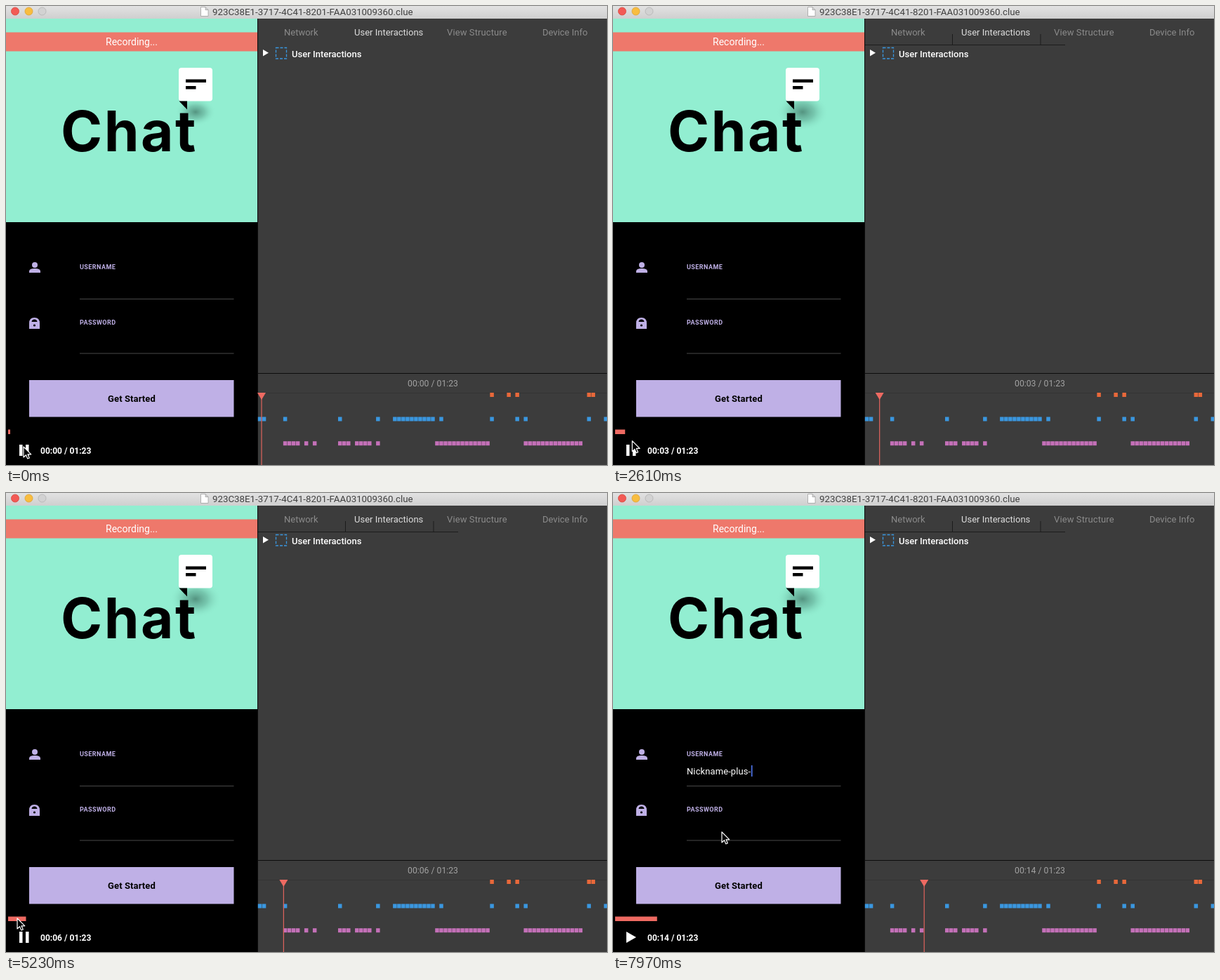
Recreate the animation shown at these times as an HTML page. Size 856x654 px, loop 8000 ms.

```html
<!DOCTYPE html>
<html lang="en">
<head>
<meta charset="utf-8">
<title>Session recorder</title>
<style>
  html, body { margin: 0; width: 100%; height: 100%; overflow: hidden; background: #3c3c3c; }
  svg { display: block; font: 13px Roboto, sans-serif; }
  text { white-space: pre; }
  .tab { fill: #8b8b8b; }
  .label { font-size: 9px; font-weight: 700; letter-spacing: .45px; fill: #bfb0e6; }
  .mid { text-anchor: middle; }
</style>
</head>
<body>
<svg width="856" height="654" viewBox="0 0 856 654">
  <defs>
    <linearGradient id="chrome" x2="0" y2="1">
      <stop stop-color="#e2e2e2"/><stop offset="1" stop-color="#cfcfcf"/>
    </linearGradient>
    <radialGradient id="shade">
      <stop stop-color="#3f7565" stop-opacity=".75"/>
      <stop offset=".45" stop-color="#5a9f8b" stop-opacity=".5"/>
      <stop offset="1" stop-color="#92eed1" stop-opacity="0"/>
    </radialGradient>
  </defs>

  <!-- Window bar -->
  <rect width="856" height="18" fill="url(#chrome)"/>
  <g stroke-width=".8">
    <circle cx="13" cy="7.5" r="5.5" fill="#f25a55" stroke="#d8483f"/>
    <circle cx="32.5" cy="7.5" r="5.5" fill="#f8bd3f" stroke="#dca032"/>
    <circle cx="51.5" cy="7.5" r="5.5" fill="#d2d2d2" stroke="#b2b2b2"/>
  </g>
  <path d="M277.5 1.5h6.500l4 4v9h-10.500zM284 1.500v4h4" fill="#fff" stroke="#a0a0a0" stroke-width=".8"/>
  <text x="294" y="12.500" font-size="13.3" fill="#404040">923C38E1-3717-4C41-8201-FAA031009360.clue</text>

  <!-- Phone screen -->
  <rect y="18" width="358" height="636"/>
  <rect y="18" width="358" height="290" fill="#92eed1"/>
  <rect y="37.500" width="358" height="27" fill="#ee786b"/>
  <text class="mid" x="179" y="56" font-size="14" fill="#fff">Recording...</text>
  <ellipse id="shadow" cx="270" cy="151" fill="url(#shade)"/>
  <rect x="246" y="88" width="48" height="47.500" rx="4" fill="#fff"/>
  <path d="M256 104.500h29v4.500h-29zM256 114h14.500v4.500h-14.500zM246.500 135.500h11.500v12z"/>
  <text x="78" y="207" style="font:700 80px Inter,sans-serif;letter-spacing:2.500px">Chat</text>

  <g fill="#bfb0e6">
    <circle cx="41" cy="369" r="4"/>
    <path d="M33 380v-2q0-4 8-4t8 4v2z"/>
    <path fill-rule="evenodd" d="M33 460v-8q0-8 7.500-8t7.500 8v8zM36.500 450h8q-.5-3.500-4-3.500t-4 3.500z"/>
    <circle cx="40.500" cy="455" r="1.600" fill="#000"/>
    <rect x="33" y="533" width="291.500" height="52.500"/>
  </g>
  <text class="label" x="105" y="374.500">USERNAME</text>
  <text class="label" x="105" y="453.500">PASSWORD</text>
  <path d="M105 417.500h219.500M105 495h219.500" stroke="#484848"/>
  <text id="entry" x="105" y="400.500" fill="#fff" letter-spacing=".1"></text>
  <rect id="caret" y="388" width="1.800" height="16" fill="#4a6ee0"/>
  <text class="mid" x="179" y="563.500" font-weight="700" letter-spacing=".1">Get Started</text>

  <!-- Player -->
  <rect id="bar" x="3" y="603.500" height="6.500" fill="#ee6a62"/>
  <path id="button" fill="#fff"/>
  <text id="clock" x="49" y="638" font-size="12" font-weight="700" fill="#fff"></text>

  <!-- Inspector -->
  <rect x="358" y="18" width="498" height="636" fill="#3c3c3c"/>
  <path d="M358.500 18v636M358 523.500h498" stroke="#0c0c0c"/>
  <path d="M359 551.500h497" stroke="#343434"/>
  <path id="tabLines" d="M359 55.500h285M483.500 40v15M609 40v15" stroke="#1c1c1c" fill="none"/>
  <text class="tab" x="396" y="42">Network</text>
  <text x="496" y="42" fill="#dedede">User Interactions</text>
  <text class="tab" x="628" y="42" letter-spacing=".1">View Structure</text>
  <text class="tab" x="764" y="42">Device Info</text>
  <path d="M366 62l8 4.800-8 4.800z" fill="#fff"/>
  <rect x="384.500" y="59.500" width="15" height="15.500" fill="none" stroke="#3a97e0" stroke-width="1.300" stroke-dasharray="4 2"/>
  <text x="407" y="73" font-weight="500" fill="#fff">User Interactions</text>
  <text id="total" class="mid" x="608" y="541.500" font-size="12.200" fill="#a2a2a2"></text>
  <g id="ticks"></g>
  <g id="head">
    <path d="M0 556v98" stroke="#e0645d" stroke-width="1.200"/>
    <path d="M-6 551h12l-6 10z" fill="#ee6a62"/>
  </g>

  <path id="cursor" d="M0 0v15l3.500-3.300 2.300 5.300 2.500-1-2.300-5.200h4.800z" stroke="#fff" stroke-width="1.200" stroke-linejoin="round"/>
</svg>
<script>
const LOOP = 8000;
const get = id => document.getElementById(id);
const set = (id, attrs) => {
  for (const name in attrs) get(id).setAttribute(name, attrs[name]);
};

// Event rows: top, colour, then runs of [first second, count]
const rows = [
  [551, '#e8683a', [[55, 1], [59, 1], [61, 1], [78, 2]]],
  [585.5, '#3a97e0', [[0, 2], [6, 1], [19, 1], [28, 1], [32, 10], [43, 1], [55, 1], [61, 1], [63, 1], [78, 1], [82, 1]]],
  [620.2, '#c470b8', [[6, 4], [11, 1], [13, 1], [19, 3], [23, 4], [28, 1], [42, 13], [63, 14]]]
];
let squares = '';
for (const [y, color, runs] of rows)
  for (const [first, count] of runs)
    for (let k = first; k < first + count; k++)
      squares += `<rect x="${358.8 + 6.01 * k}" y="${y}" width="5.5" height="6" fill="${color}"/>`;
get('ticks').innerHTML = squares;

// Keys are [time, ...values]; paired times make hard jumps
const playKeys = [[0, 0], [5400, 5.4], [5560, 5.4], [6310, 7.9], [6429, 7.9],
  [6430, 12.6], [7000, 12.6], [7560, 13.2]];
const cursorKeys = [[0, 25, 628], [1480, 25, 628], [2090, 36, 625], [2290, 36, 625],
  [3070, 15, 612], [3420, 15, 612], [3850, 16, 606], [5400, 16, 606], [5580, 30, 606],
  [6310, 43, 607], [6429, 43, 607], [6430, 63, 607], [7000, 63, 607],
  [7500, 24, 632], [7969, 24, 632], [7970, 155, 483]];

function at(keys, t) {
  const i = keys.findIndex(key => key[0] > t);
  if (i < 0) return keys[keys.length - 1].slice(1);
  const a = keys[i - 1], b = keys[i];
  const p = (t - a[0]) / (b[0] - a[0]);
  return a.slice(1).map((v, j) => v + (b[j + 1] - v) * p);
}

const typed = 'Nickname-plus-';
const PAUSE = 'M19 625h4.500v16h-4.500zM28 625h4.500v16h-4.500z';
const PLAY = 'M19 625l14 8-14 8z';

function draw(t) {
  const [sec] = at(playKeys, t);
  const [x, y] = at(cursorKeys, t);
  const shown = Math.max(0, Math.ceil(sec - .1));
  const time = `00:${String(shown).padStart(2, '0')} / 01:23`;
  get('clock').textContent = get('total').textContent = time;

  set('head', { transform: `translate(${364 + 6 * sec})` });
  set('bar', { width: 3 + 4.3 * sec });
  set('button', { d: t < 7560 ? PAUSE : PLAY });
  set('cursor', { transform: `translate(${x} ${y})` });

  const count = Math.max(0, Math.min(typed.length, Math.round((sec - 5.8) * 2.1)));
  const entry = get('entry');
  entry.textContent = typed.slice(0, count);
  const end = count ? entry.getComputedTextLength() : 0;
  set('caret', { x: 105.5 + end, opacity: sec > 5.8 ? 1 : 0 });

  const settled = t >= 60;
  set('shadow', { rx: settled ? 37 : 29, ry: settled ? 27 : 20 });
  set('tabLines', { opacity: settled ? 1 : 0 });
}

const start = performance.now();
function tick() {
  draw((performance.now() - start) % LOOP);
  requestAnimationFrame(tick);
}
tick();
</script>
</body>
</html>
```
